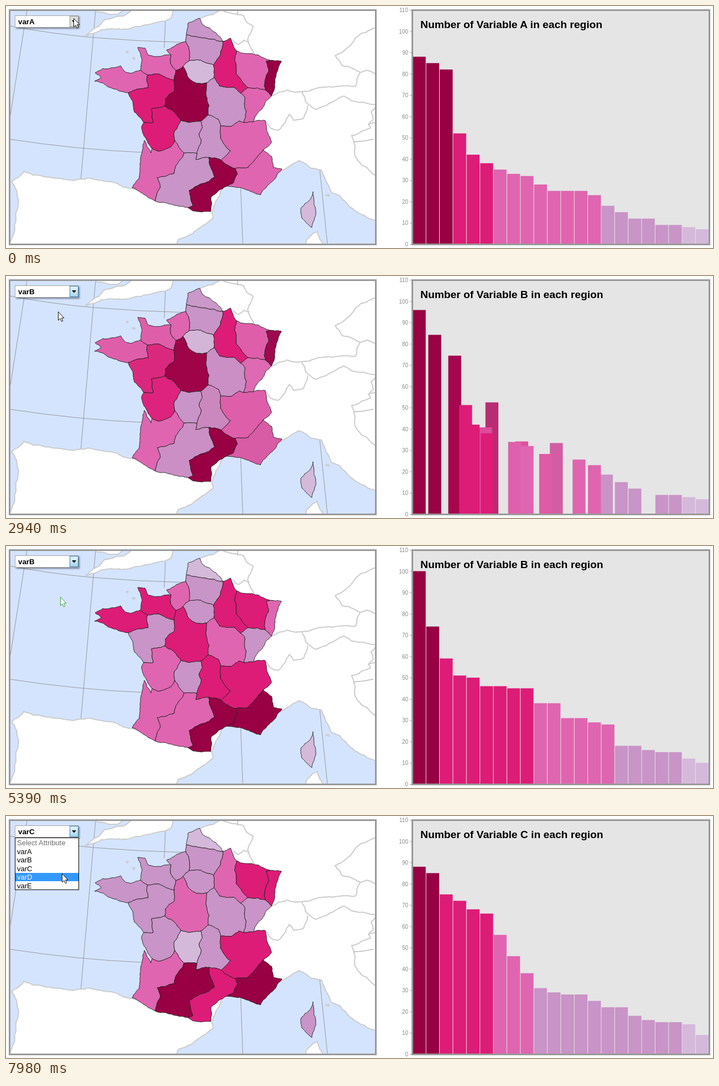
Write an HTML page that moves like this. It is 1278x438 px and loops after 8 s.

```html
<!DOCTYPE html>
<html lang="en">
<head>
<meta charset="utf-8">
<title>Regions by variable</title>
<style>
html, body { margin: 0; width: 100%; height: 100%; overflow: hidden; background: #fff; }
svg { display: block; width: 1278px; height: 438px; font-family: "Liberation Sans", Arial, sans-serif; }
.sea { fill: #d4e4ff; }
.land { fill: #fff; }
.land, .border { stroke: #ccc; stroke-width: 2; stroke-linejoin: round; }
.border { fill: none; }
.grid { fill: none; stroke: #999; }
.region { stroke: #222; stroke-width: .9; stroke-linejoin: round; }
.frame { fill: none; stroke: #999; stroke-width: 3; }
.axis { font-size: 10px; fill: #888; text-anchor: end; }
.title { font-size: 19.25px; font-weight: bold; }
.value { font-size: 13.33px; font-weight: bold; }
.item { font-size: 13px; }
</style>
</head>
<body>
<svg viewBox="0 0 1278 438">
  <defs>
    <clipPath id="mapClip"><rect x="6" y="7" width="663" height="424"/></clipPath>
    <filter id="shade" x="-10%" y="-20%" width="125%" height="170%">
      <feDropShadow dx="2" dy="2" stdDeviation="1.5" flood-opacity=".45"/>
    </filter>
    <linearGradient id="button" x2="0" y2="1">
      <stop offset="0" stop-color="#e8f5fc"/><stop offset="1" stop-color="#a5d5ef"/>
    </linearGradient>
  </defs>
  <g clip-path="url(#mapClip)">
    <rect class="sea" width="680" height="438"/>
    <path class="grid" d="M38 7L7 203M162 7L135 318M289 7L286 76M424 320L428 431M566 285L581 431M6 36Q80 50 157 57Q240 64 325 66M6 241Q130 260 248 265"/>
    <g id="base"></g>
    <path class="grid" d="M629 246Q648 245 664 241"/>
    <g id="regions"></g>
  </g>
  <rect class="frame" x="6.5" y="7.5" width="662" height="424"/>

  <rect x="735" y="7" width="536" height="424" fill="#e5e5e5"/>
  <g id="axis"></g>
  <g id="bars"></g>
  <rect class="frame" x="734.5" y="7.5" width="537" height="424"/>
  <text class="title" id="title" x="749" y="39.5"></text>

  <g filter="url(#shade)"><rect x="16.5" y="17.5" width="114" height="21" fill="#fff" stroke="#aaa"/></g>
  <rect id="knob" x="115.5" y="18.5" width="15" height="19"/>
  <path d="M119 26h8l-4 4.5z"/>
  <text class="value" id="value" x="22" y="33"></text>
  <g id="list">
    <rect x="16.5" y="39.5" width="115" height="94" fill="#fff" stroke="#000"/>
    <rect id="mark" x="17" width="114" height="15" fill="#39f"/>
  </g>
  <path id="cursor" d="M.5 .5V16L4 12.7 6.3 18 8.8 17 6.5 11.8H11Z" fill="#fff" stroke-linejoin="round"/>
</svg>
<script>
const $ = id => document.getElementById(id);
const clamp = u => Math.min(1, Math.max(0, u));
const cubic = u => (u = clamp(u)) < .5 ? 4 * u ** 3 : 1 - 4 * (1 - u) ** 3;
const smooth = u => (u = clamp(u)) * u * (3 - 2 * u);
const mix = (a, b, p) => a + (b - a) * p;

function add(parent, tag, attrs) {
  const el = document.createElementNS('http://www.w3.org/2000/svg', tag);
  for (const k in attrs) el.setAttribute(k, attrs[k]);
  return $(parent).appendChild(el);
}

// Ragged lines: seeded midpoint displacement between a few key points
let seed = 7;
const rand = () => (seed = seed * 16807 % 2147483647) / 2147483647 - .5;
function crumple(a, b) {
  const dx = b[0] - a[0], dy = b[1] - a[1];
  if (Math.hypot(dx, dy) < 4) return [a];
  const o = rand() * .17, m = [(a[0] + b[0]) / 2 - dy * o, (a[1] + b[1]) / 2 + dx * o];
  return [...crumple(a, m), ...crumple(m, b)];
}
const points = text => (text.match(/\S+ \S+/g) || []).map(p => p.split(' ').map(Number));
const ragged = pts => pts.slice(1).flatMap((p, i) => crumple(pts[i], p)).concat([pts.at(-1)]);
const toPath = pts => 'M' + pts.map(p => p.map(v => v.toFixed(1)).join(' ')).join('L');
const draft = (cls, text) => add('base', 'path', { class: cls, d: toPath(ragged(points(text))) });

// Neighbouring land: continent, islands, inland sea, frontiers
draft('land', '400 -5 375 15 352 22 340 80 275 140 290 240 238 332 205 324 190 318 120 316 66 308 32 299 10 318 19 333 23 354 18 373 5 431 -5 445 304 445 312 422 345 405 374 385 372 372 395 310 480 305 530 280 552 294 570 297 588 337 603 343 628 368 680 392 680 -5');
draft('land', '143 54 168 37 178 25 212 18 228 5 308 -5 298 22 255 34 215 42 172 43 143 54');
draft('land', '148 -5 165 11 202 15 220 -5');
draft('land', '540 440 543 424 563 408 576 440');
draft('land', '577 342 583 341 584 344 577 342');
draft('land', '217 82 221 83 219 85 217 82');
draft('land', '228 94 233 94 232 97 228 94');
draft('land sea', '680 212 655 214 659 221 625 234 631 272 641 286 680 314');
draft('border', '393 10 430 18 434 28 447 37 437 60 450 88');
draft('border', '422 -5 418 17');
draft('border', '411 62 420 70 430 62 440 65');
draft('border', '680 36 640 51 595 90 608 108 640 120 632 145 590 147 535 155 508 152 480 163');
draft('border', '640 120 652 116 680 124');
draft('border', '535 155 541 172 560 187 590 174 611 163 626 172 680 182');
draft('border', '468 207 478 221 492 225 512 196 520 207 538 203 545 180');
draft('border', '669 182 660 192 664 205 655 214');

// Corners where regions meet
const corners = {};
for (const c of ('A326,52 p350,22 B392,64 C325,64 D331,99 E375,107 F298,88 G307,117 H320,109 I304,134 J256,125 ' +
  'K243,116 L221,157 M376,130 N363,139 O417,81 P437,148 Q424,158 R484,99 S469,152 T480,163 U430,211 V447,210 ' +
  'W388,217 X366,197 Y352,208 Z316,207 a287,181 b249,211 c305,243 d264,258 e322,266 f345,267 g367,274 ' +
  'h389,279 i414,294 j465,260 k399,326 l329,365 m270,353 n555,336 o553,401').split(' '))
  corners[c[0]] = c.slice(1).split(',').map(Number);

// Bends of the sides that are not straight between their corners
const bends = {
  Ap: '329 31', pB: '356 34 379 48', AB: '360 58', CD: '330 73', DE: '352 98', BE: '388 86',
  FC: '290 80 310 69', FG: '297 104', KF: '246 98 238 75 251 76 256 88', IJ: '276 123',
  LK: '192 149 160 136 172 130 161 121 175 113 207 108 214 118 225 122', JL: '257 148',
  Lb: '229 172 232 192', Ia: '304 154 288 168', ab: '263 186 266 211', HN: '328 127 345 140',
  BO: '406 58 411 72', OP: '413 98 416 123', QM: '411 147 386 145', OR: '445 86 468 95',
  RS: '470 100 475 118 467 144', RT: '498 100 486 146', TV: '470 172 452 198', QU: '431 164 434 190',
  UW: '421 208 408 218', WX: '384 205', XN: '367 180 362 162', YZ: '332 211', Za: '302 190',
  bd: '245 219 253 240', Zc: '304 228', cd: '298 255 276 263', Yf: '355 220 349 231 353 243',
  fg: '343 278', hW: '406 262 388 240', Vj: '455 207 468 207 471 221 480 247', ji: '455 272 438 292',
  jk: '480 272 483 292 499 295 486 313 460 342 430 331', ik: '418 305 411 320',
  kl: '371 345 370 372 338 371', lg: '338 361 331 334 377 310', lm: '306 361',
  me: '279 328 273 311 304 303', md: '228 329 241 312 250 243 262 266',
  no: '560 368 557 388', on: '535 384 533 366 549 351'
};
const sides = {};
function side(a, b) {
  if (sides[a + b]) return sides[a + b];
  if (!bends[a + b] && (bends[b + a] || sides[b + a])) return [...side(b, a)].reverse();
  return sides[a + b] = ragged([corners[a], ...points(bends[a + b] || ''), corners[b]]);
}

// Ring of corners, then the values of variables A, B and C
const regions = [
  'ApB 12 10 9', 'ABEDC 9 16 22', 'FCDHG 32 28 22', 'ORSP 28 50 68', 'RTS 85 31 66', 'GHNXYZaI 82 46 46',
  'KFGIJ 25 46 16', 'BOPQME 52 45 38', 'KJL 33 45 28', 'LJIab 42 18 25', 'XWhgfY 12 59 28', 'PSTVUQ 23 18 18',
  'NMQUWX 15 29 29', 'baZcd 38 31 15', 'ZYfec 9 15 14', 'HDEMN 8 15 31', 'UVjihW 35 51 72', 'ijk 25 74 88',
  'dcem 25 38 56', 'efglm 18 38 85', 'ghikl 88 100 75', 'no 7 12 15'
].map(row => {
  const [ring, ...values] = row.split(' ');
  const outline = [...ring].flatMap((c, i) => side(c, ring[(i + 1) % ring.length]));
  return {
    values: values.map(Number), ranks: [],
    shape: add('regions', 'path', { class: 'region', d: toPath(outline) + 'Z' }),
    bar: add('bars', 'rect', {})
  };
});
const sorted = v => [...regions].sort((a, b) => b.values[v] - a.values[v]);
for (const v of [0, 1, 2]) sorted(v).forEach((r, i) => r.ranks[v] = i);

const palette = [[152, 0, 67], [221, 28, 119], [223, 101, 176], [201, 148, 199], [212, 185, 218]];
const breaks = [[82, 38, 23, 9], [74, 45, 28, 15], [85, 66, 38, 15]];
const colour = (r, v) => palette[breaks[v].filter(b => r.values[v] < b).length];
const blend = (a, b, p) => `rgb(${a.map((c, i) => Math.round(mix(c, b[i], p)))})`;
const unit = 424 / 110, pitch = 536 / regions.length;

for (let v = 0; v <= 110; v += 10) {
  const y = 431.5 - v * unit;
  add('axis', 'path', { d: `M730 ${y}h5`, stroke: '#999' });
  add('axis', 'text', { class: 'axis', x: 727, y: y + 3.5 }).textContent = v;
}

const items = ['Select Attribute', 'varA', 'varB', 'varC', 'varD', 'varE'].map((s, i) => {
  const el = add('list', 'text', { class: 'item', x: 20, y: Math.round(53 + i * 15.6) });
  el.textContent = s;
  return el;
});

const opens = [1190, 3920, 6930], closes = [2660, 5390, 8000];
// pointer moves: start, end, x, y
const moves = [[1400, 1890, 93, 90], [2030, 2240, 88, 79], [2800, 3150, 105, 37], [3150, 3360, 109, 22],
  [3430, 3640, 123, 27], [4200, 4830, 98, 86], [4900, 5110, 98, 92], [5670, 6370, 124, 27], [7210, 7980, 101, 104]];
const pointer = t => moves.reduce(([x, y], [from, to, x2, y2]) => {
  const p = smooth((t - from) / (to - from));
  return [mix(x, x2, p), mix(y, y2, p)];
}, [122, 22]);

let lastStep = -1;
function drawData(t) {
  const step = t >= closes[1] ? 1 : 0, next = step + 1, since = t - closes[step] + 10;
  if (step !== lastStep) {
    for (const r of sorted(next)) $('bars').append(r.bar);
    lastStep = step;
  }
  for (const r of regions) {
    const from = colour(r, step), to = colour(r, next);
    const p = cubic((since - r.ranks[next] * 19) / 520);
    const h = mix(r.values[step], r.values[next], p) * unit;
    const box = { x: 735.3 + pitch * mix(r.ranks[step], r.ranks[next], p), y: 431 - h, width: pitch - 1, height: h };
    for (const k in box) r.bar.setAttribute(k, box[k]);
    r.bar.setAttribute('fill', blend(from, to, p));
    r.shape.setAttribute('fill', blend(from, to, cubic(since / 1000)));
  }
}

function drawMenu(t) {
  const current = closes.filter(c => t >= c + 70).length, letter = 'ABC'[current];
  $('title').textContent = `Number of Variable ${letter} in each region`;
  $('value').textContent = 'var' + letter;

  const [x, y] = pointer(t);
  const hover = Math.max(current + 1, Math.floor((y - 40) / 15.7));
  $('list').style.display = opens.some((o, i) => t >= o && t < closes[i]) ? '' : 'none';
  $('mark').setAttribute('y', Math.round(40.4 + hover * 15.7));
  items.forEach((el, i) => el.setAttribute('fill', i === hover ? '#fff' : i ? '#000' : '#6d6d6d'));
  const idle = t < opens[0];
  $('knob').setAttribute('fill', idle ? '#ddd' : 'url(#button)');
  $('knob').setAttribute('stroke', idle ? '#999' : '#3c7fb1');
  const picked = closes.some(c => t >= c && t < c + 70);
  $('cursor').setAttribute('transform', `translate(${x.toFixed(1)} ${y.toFixed(1)})`);
  $('cursor').setAttribute('stroke', picked ? '#3a9a3a' : '#111');
}

// The picture advances in 70 ms steps
const begin = performance.now();
function tick(now) {
  const t = Math.floor((Math.max(0, now - begin) % 8000 + .5) / 70) * 70;
  drawData(t);
  drawMenu(t);
  requestAnimationFrame(tick);
}
tick(begin);
</script>
</body>
</html>
```
